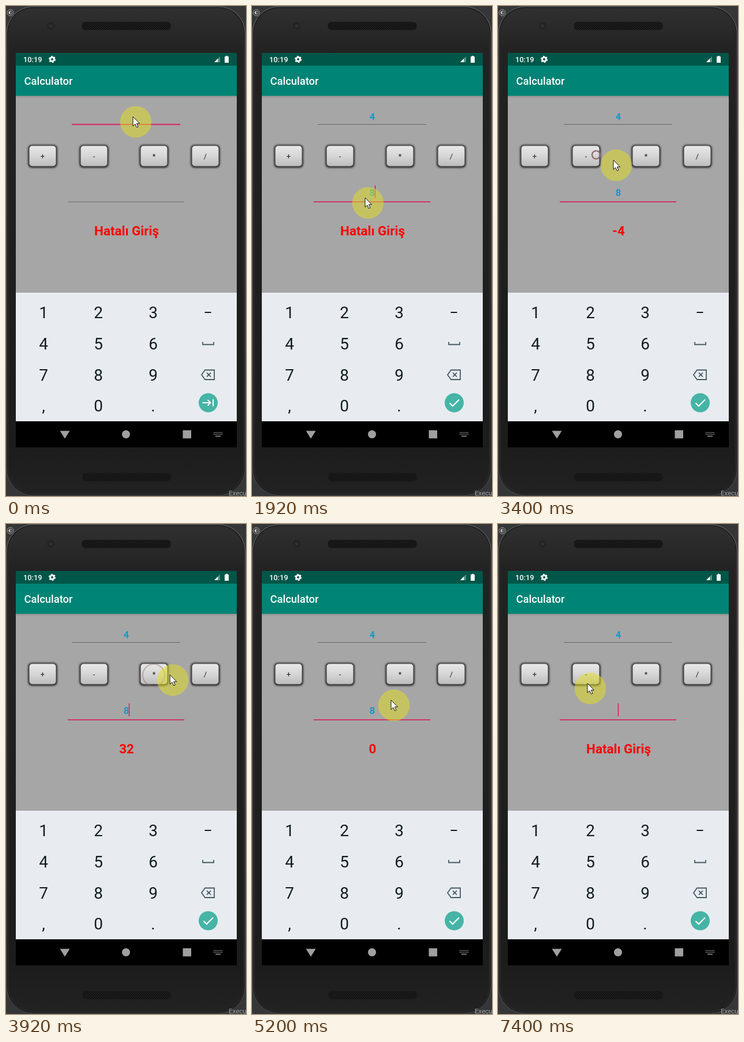
Animation of 416 by 846 pixels, one loop 7520 ms. Source, as an HTML page:

```html
<!DOCTYPE html>
<html lang="tr">
<head>
<meta charset="utf-8">
<title>Calculator</title>
<style>
html, body { margin: 0; width: 100%; height: 100%; overflow: hidden; background: #343638; }
svg { display: block; width: 100%; height: 100%; font-family: Roboto, sans-serif; }
.mid { text-anchor: middle; }
.bold { font-weight: 700; }
</style>
</head>
<body>
<svg viewBox="0 0 416 846" preserveAspectRatio="none">
  <defs>
    <linearGradient id="shell" x2="0" y2="1">
      <stop offset="0" stop-color="#303030"/>
      <stop offset=".09" stop-color="#222"/>
      <stop offset=".9" stop-color="#1c1c1c"/>
      <stop offset="1" stop-color="#222"/>
    </linearGradient>
    <linearGradient id="rim" x2="0" y2="1">
      <stop offset="0" stop-color="#6c6c6c"/>
      <stop offset="1" stop-color="#4a4a4a"/>
    </linearGradient>
    <linearGradient id="metal" x2="0" y2="1">
      <stop offset="0" stop-color="#e8e8e8"/>
      <stop offset=".5" stop-color="#d6d6d6"/>
      <stop offset="1" stop-color="#bcbcbc"/>
    </linearGradient>
    <linearGradient id="shade" x2="0" y2="1">
      <stop offset="0" stop-color="#000" stop-opacity=".16"/>
      <stop offset="1" stop-color="#000" stop-opacity="0"/>
    </linearGradient>
    <pattern id="mesh" width="4" height="4" patternUnits="userSpaceOnUse">
      <rect width="4" height="4" fill="#1e1e1e"/>
      <circle cx="1" cy="1" r="1" fill="#0b0b0b"/><circle cx="3" cy="3" r="1" fill="#0b0b0b"/>
    </pattern>
    <filter id="blur" x="-20%" y="-20%" width="140%" height="140%"><feGaussianBlur stdDeviation="1.4"/></filter>
    <filter id="soften"><feGaussianBlur stdDeviation=".6"/></filter>
  </defs>

  <!-- phone -->
  <rect width="416" height="846" fill="#343638"/>
  <circle cx="7.5" cy="11.5" r="5.5" fill="none" stroke="#a5a7a9"/>
  <path d="M7.5 8.5a3 3 0 0 0 0 6z" fill="#c0c2c4"/><path d="M7.5 8.5a3 3 0 0 1 0 6" fill="none" stroke="#a5a7a9"/>
  <rect x="1" y="1" width="413.5" height="844" rx="46" fill="#202020" stroke="url(#rim)"/>
  <rect x="4" y="4" width="407.5" height="838" rx="43" fill="url(#shell)" stroke="#2e2e2e"/>
  <text x="386" y="845" font-size="11.5" fill="#a0a2a4">Execution</text>
  <circle cx="77.5" cy="34" r="6.5" fill="#232323"/><circle cx="77.5" cy="34.5" r="3" fill="#303032"/>
  <rect x="132" y="28" width="153" height="13" rx="5" fill="url(#mesh)" stroke="#161616"/>
  <rect x="133" y="807" width="152" height="13" rx="5" fill="url(#mesh)" stroke="#161616"/>

  <!-- screen -->
  <rect x="17" y="81" width="383" height="681"/>
  <rect x="17" y="155" width="383" height="340" fill="#a6a6a6"/>
  <rect x="17" y="155" width="383" height="4" fill="url(#shade)"/>
  <rect x="17" y="103" width="383" height="52" fill="#008475"/>
  <rect x="17" y="81" width="383" height="22" fill="#005648"/>
  <g fill="#fff" font-weight="500">
    <text x="30" y="97" font-size="12.8">10:19</text>
    <text x="31.5" y="136" font-size="18.4">Calculator</text>
  </g>
  <circle cx="80" cy="92" r="3.4" fill="none" stroke="#fff" stroke-width="2.8"/>
  <circle cx="80" cy="92" r="5.2" fill="none" stroke="#fff" stroke-width="1.8" stroke-dasharray="2.7 2.745"/>
  <path d="M361 97h10V87z" fill="#fff" opacity=".35"/><path d="M361 97h6.2v-6.2z" fill="#fff"/>
  <path d="M379 87.3h2V86h3v1.3h2V98h-7z" fill="#fff"/>
  <g id="buttons" class="mid" font-size="13" fill="#222"></g>

  <path id="line1" d="M114 204.5H302"/>
  <path id="line2" d="M107 338.2H309"/>
  <g class="mid bold">
    <g font-size="16.5" fill="#169ac2">
      <text id="first" x="208.5" y="197"></text>
      <text id="second" x="208.5" y="328"></text>
    </g>
    <text id="result" x="209" y="396.3" font-size="22.4" fill="#f00"></text>
  </g>
  <path id="caret" stroke="#d81b60" stroke-width="1.5"/>

  <!-- keyboard -->
  <rect x="17" y="495" width="383" height="222" fill="#e8ecf0"/>
  <g id="keys" class="mid" font-size="28" fill="#111c22"></g>
  <g fill="none" stroke="#455a64" stroke-width="1.8">
    <path d="M344.5 529H355.5" stroke="#111c22" stroke-width="2"/>
    <path d="M341 580v4.5h19V580"/>
    <path d="M345 628.5h16v16.5h-16l-6-8.2zM348 633.2l7 7m0-7l-7 7"/>
  </g>
  <circle cx="350.5" cy="685" r="16.5" fill="#46b4a6"/>
  <path id="action" fill="none" stroke="#fff" stroke-width="2"/>

  <!-- navigation bar -->
  <g fill="#a0a0a0">
    <path d="M93.5 733.5h17L102 747z"/>
    <circle cx="208" cy="739.5" r="7"/>
    <rect x="306.5" y="732.5" width="14.5" height="14"/>
    <path d="M360 736.5h15M360 739.5h15" stroke="#a0a0a0" stroke-width="1.6" stroke-dasharray="1.5 1.2"/>
    <rect x="363" y="742" width="9" height="1.4"/>
  </g>

  <!-- pointer -->
  <circle id="ring" fill="none" stroke="#8d6468" stroke-width="2.2"/>
  <g id="pointer">
    <circle r="27.2" fill="#e6e21e" fill-opacity=".5"/>
    <path transform="translate(-5 -9)" d="M0 0V16.3L3.8 12.8L6.4 18.6L9 17.5L6.5 11.8H11.5Z" fill="#fff" stroke="#111"/>
  </g>
</svg>
<script>
const LOOP = 7520;
const el = Object.fromEntries([...document.querySelectorAll('[id]')].map(e => [e.id, e]));
const set = (e, attrs) => Object.entries(attrs).forEach(([k, v]) => e.setAttribute(k, v));

el.buttons.innerHTML = [[38, '+'], [127, '-'], [231, '*'], [320, '/']].map(([x, sign]) => `
  <rect x="${x}" y="239.5" width="51" height="40" rx="7" fill="#333" filter="url(#blur)"/>
  <rect x="${x + 2.5}" y="241.5" width="46" height="35" rx="5" fill="url(#metal)" filter="url(#soften)"/>
  <text x="${x + 25.5}" y="264">${sign}</text>`).join('');

el.keys.innerHTML = ['123', '456', '789', ',0.'].map((row, r) =>
  [...row].map((key, c) => `<text x="${65 + 95 * c}" y="${539 + 53.8 * r}">${key}</text>`).join('')).join('');

// time, x, y of the pointer halo
const path = [
  [0, 225, 200], [320, 225, 193], [800, 216, 219], [1000, 240, 320], [1120, 245, 370],
  [1600, 245, 370], [1720, 235, 347], [1920, 201, 340], [2320, 75, 265], [2600, 75, 265],
  [3080, 175, 266], [3280, 175, 266], [3400, 205, 275], [3600, 261, 270], [3800, 261, 270],
  [4200, 355, 268], [4520, 353, 269], [5000, 349, 267], [5200, 246, 313], [5320, 236, 325],
  [5520, 231, 331], [5640, 231, 331], [5920, 280, 325], [6400, 221, 319], [6520, 180, 291],
  [6720, 158, 278], [6920, 155, 276], [7120, 155, 276], [7400, 160, 284]
];
const results = [[0, 'Hatalı Giriş'], [2400, '12'], [3320, '-4'], [3800, '32'], [4720, '0'], [6920, 'Hatalı Giriş']];
const clicks = [2400, 3320, 3720, 4600, 6800];

function pointerAt(t) {
  const i = path.findIndex(p => p[0] > t);
  if (i < 0) return path.at(-1).slice(1);
  const [a, b] = [path[i - 1], path[i]], k = (t - a[0]) / (b[0] - a[0]);
  return [1, 2].map(n => a[n] + (b[n] - a[n]) * k);
}

function underline(line, active) {
  set(line, { stroke: active ? '#d4245f' : '#686868', 'stroke-width': active ? 1.8 : 1.1 });
}

function draw(t) {
  const onSecond = t >= 520, typed = t >= 320, hasEight = t >= 1520 && t < 5920;
  el.first.textContent = typed ? '4' : '';
  el.second.textContent = hasEight ? '8' : '';
  el.result.textContent = results.findLast(r => r[0] <= t)[1];
  underline(el.line1, !onSecond);
  underline(el.line2, onSecond);

  const blink = t >= 320 && t < 540 || t >= 540 && (t - 540) % 980 < 490;
  const caretX = (onSecond ? hasEight : typed) ? 213.5 : 208.5;
  set(el.caret, { d: `M${caretX} ${onSecond ? 309.5 : 178.5}v22.5`, visibility: blink ? 'visible' : 'hidden' });

  set(el.action, { d: onSecond ? 'M342.5 685.5l5.3 5.3L359 679.5' : 'M340.5 685h14m-5-5l5 5l-5 5M359 679v12' });

  const [x, y] = pointerAt(t);
  set(el.pointer, { transform: `translate(${x} ${y})` });

  const click = clicks.find(c => t > c && t - c <= 200);
  if (click) {
    const [cx, cy] = pointerAt(click - 60), spread = Math.max(0, t - click - 80);
    set(el.ring, { cx: cx - 5, cy: cy - 9, r: 7 + spread / 10, opacity: 1 - spread / 200 });
  }
  el.ring.setAttribute('visibility', click ? 'visible' : 'hidden');
}

function tick() {
  const t = performance.now() % LOOP, rest = t % 200;
  draw(Math.round(t - rest) + (rest >= 120 ? 120 : 0));
  requestAnimationFrame(tick);
}
tick();
</script>
</body>
</html>
```
